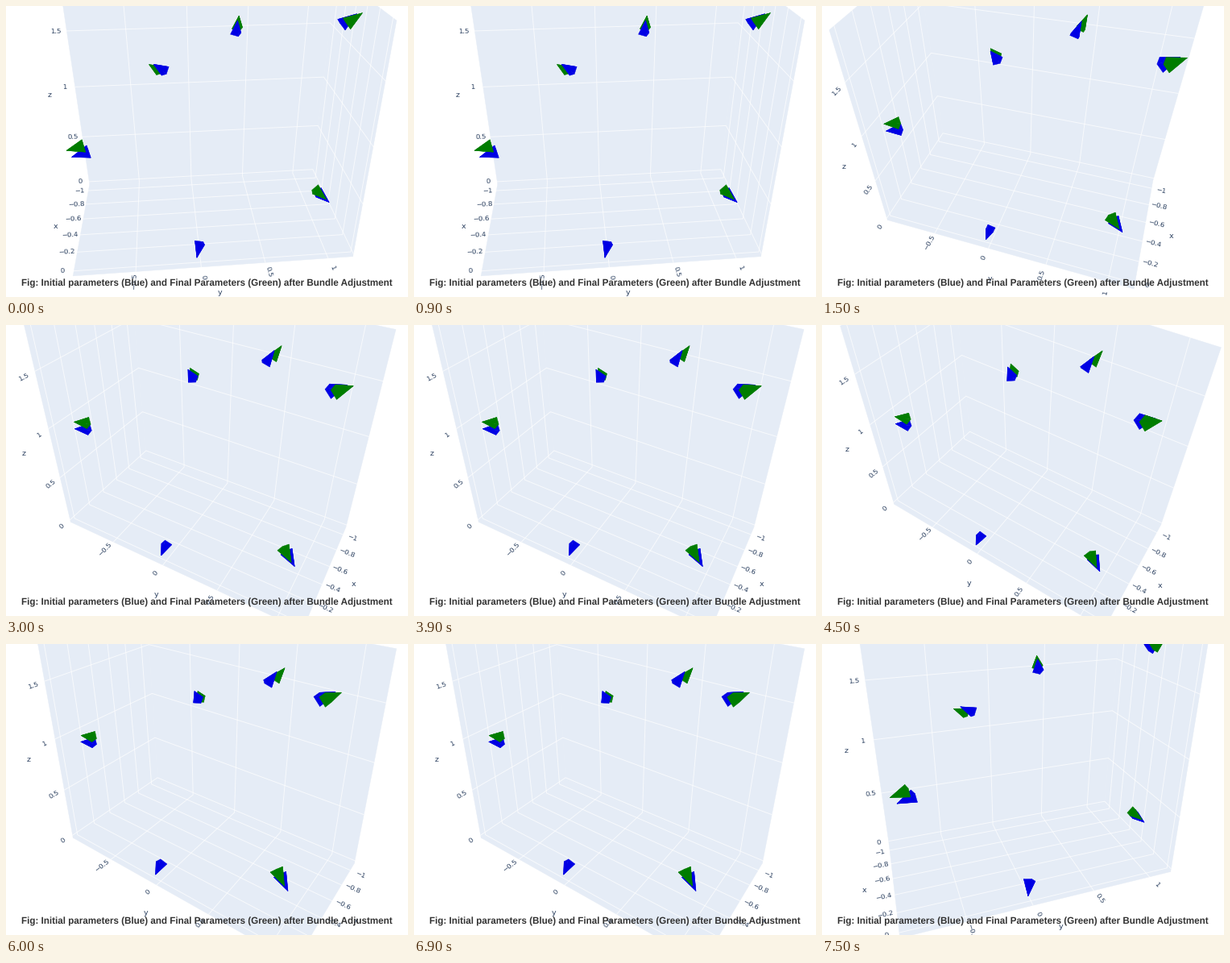
Write a matplotlib script that moves like this. It is 499x361 px and loops after 9000 ms.

```python
import matplotlib.pyplot as plt
import numpy as np
from matplotlib.animation import FuncAnimation
from matplotlib.patches import Polygon

W, H, DPI = 499, 361, 100
HOLD = 1500
PANEL, INK = "#e5ecf6", "#2a3f5f"
GREEN, BLUE = "#007d00", "#0000e4"
CAPTION = ("Fig: Initial parameters (Blue) and Final Parameters (Green) "
           "after Bundle Adjustment")

# Plot box and ticks, in data units.
X0, X1 = -1.1, 0.05
Y0, Y1 = -0.97, 1.2
LO, HI = -0.03, 1.9
X_TICKS = np.linspace(-1, 0, 6)
Y_TICKS = np.linspace(-0.5, 1, 4)
Z_TICKS = np.linspace(0, 1.5, 4)
CORNERS = dict(A=(X0, Y0), B=(X0, Y1), C=(X1, Y1), D=(X1, Y0))

# Each view: the side wall shown, and where heights on the box's vertical
# edges fall on the stage. The camera is solved from these.
VIEWS = [
    (Y1, dict(A={LO: (104, 222), 1: (86, 101), 1.5: (76, 30)},
              B={LO: (382, 206), 1: (394, 89), 1.5: (400, 19)},
              C={LO: (430, 310), HI: (487, 20)}, D={LO: (82, 334)})),
    (Y0, dict(A={LO: (148, 164), 1: (139, 55)},
              B={LO: (411, 215), 1: (441, 109)},
              C={LO: (388, 352)}, D={LO: (82, 263), HI: (7, 32)})),
    (Y0, dict(A={LO: (174, 159), 1: (163, 54)},
              B={LO: (422, 250), 1: (452, 135), HI: (484, 9)},
              C={LO: (366, 380)}, D={LO: (82, 245), 1.5: (36, 55)})),
    (Y0, dict(A={LO: (183, 136), 1: (175, 36)},
              B={LO: (419, 250), 1: (455, 146), HI: (495, 30)},
              C={LO: (351, 377)}, D={LO: (90, 221), HI: (21, 3)})),
    (Y0, dict(A={LO: (188, 169), 1: (180, 62)},
              B={LO: (433, 271), 1: (458, 144), HI: (485, 9)},
              C={LO: (356, 397)}, D={LO: (85, 241), 1.5: (48, 44)})),
    (Y1, dict(A={LO: (83, 249), 1: (65, 118), 1.5: (53, 45)},
              B={LO: (351, 197), 1: (360, 83), 1.5: (366, 19)},
              C={LO: (432, 284), 1: (456, 142)}, D={LO: (97, 364)})),
]

# Frusta in painting order, each sighted in two views to place it in space.
SIGHTED_IN = (0, 3)
FRUSTA = [
    (GREEN, (187, 79), (236, 53)), (BLUE, (193, 79), (233, 58)),
    (GREEN, (289, 23), (340, 39)), (BLUE, (287, 29), (330, 47)),
    (BLUE, (424, 18), (402, 118)), (GREEN, (431, 17), (409, 120)),
    (BLUE, (94, 183), (101, 124)), (GREEN, (88, 176), (100, 115)),
    (BLUE, (392, 235), (340, 297)), (GREEN, (389, 232), (336, 291)),
    (BLUE, (239, 301), (195, 266)),
]
DEPTH, HALF = 0.12, 0.033


def solve_camera(marks):
    """Least-squares 3x4 projection from points on the box's edges."""
    rows, rhs = [], []
    for name, heights in marks.items():
        for z, (u, v) in heights.items():
            p = np.array([*CORNERS[name], z, 1])
            rows.append([*p, 0, 0, 0, 0, *(-u * p[:3])])
            rows.append([0, 0, 0, 0, *p, *(-v * p[:3])])
            rhs += [u, v]
    best = np.linalg.lstsq(np.array(rows), np.array(rhs), rcond=None)[0]
    return np.append(best, 1).reshape(3, 4)


def project(cam, pts):
    pts = np.atleast_2d(pts)
    q = np.column_stack([pts, np.ones(len(pts))]) @ cam.T
    return q[:, :2] / q[:, 2:]


def locate(cams, pixels):
    rows = np.array([px[k] * cam[2] - cam[k]
                     for cam, px in zip(cams, pixels) for k in (0, 1)])
    return np.linalg.lstsq(rows[:, :3], -rows[:, 3], rcond=None)[0]


def unit(v):
    return v / np.linalg.norm(v)


def frustum(pos, middle):
    """Four side faces of a pyramid whose tip points away from the middle."""
    out = unit(pos - middle)
    side = unit(np.cross(out, [1, 0, 0]))
    up = np.cross(side, out)
    tip = pos + out * DEPTH * 0.6
    base = [pos - out * DEPTH * 0.4 + HALF * (a * side + b * up)
            for a, b in ((-1, -1), (1, -1), (1, 1), (-1, 1))]
    return [[tip, base[i], base[i - 1]] for i in range(4)]


def px(size):
    return size * 72 / DPI


plt.rcParams["text.hinting"] = "none"
fig = plt.figure(figsize=((W + 0.01) / DPI, (H + 0.01) / DPI), dpi=DPI,
                 facecolor="white")
ax = fig.add_axes([0, 0, 1, 1])
ax.set_xlim(0, W)
ax.set_ylim(H, 0)
ax.axis("off")


def shape(cam, pts, color, z):
    return ax.add_patch(Polygon(project(cam, pts), closed=True, fc=color,
                                ec=color, lw=0.3, zorder=z))


def label(pos, text, size, angle=0):
    return ax.text(*pos, text, size=px(size), color=INK, rotation=angle,
                   ha="center", va="center", family="DejaVu Sans",
                   zorder=3, clip_on=True)


def axis_labels(cam, title, ticks, point, out):
    """Tick texts beside an edge, turned to run along the outward direction."""
    parts = []
    for t in ticks:
        a, b = project(cam, [point(t), point(t) + out])
        dx, dy = b - a
        angle = (np.degrees(np.arctan2(-dy, dx)) + 90) % 180 - 90
        text = f"{t:.1f}".removesuffix(".0").replace("-", "−")
        parts.append(label(b, "0" if abs(t) < 1e-9 else text, 8.5, angle))
    mid = {"x": X0 + X1, "y": Y0 + Y1, "z": LO + HI}[title] / 2
    spot = project(cam, point(mid) + 2.6 * out)[0]
    return parts + [label(spot, title, 9.5)]


def build(cam, wall, solids):
    open_y = Y0 if wall == Y1 else Y1
    parts = [
        shape(cam, [(X0, Y0, LO), (X0, Y1, LO), (X0, Y1, HI), (X0, Y0, HI)], PANEL, 1),
        shape(cam, [(X0, Y0, LO), (X0, Y1, LO), (X1, Y1, LO), (X1, Y0, LO)], PANEL, 1),
        shape(cam, [(X0, wall, LO), (X1, wall, LO), (X1, wall, HI), (X0, wall, HI)], PANEL, 1),
    ]

    bends = [[(X0, open_y, z), (X0, wall, z), (X1, wall, z)] for z in Z_TICKS]
    bends += [[(X0, y, HI), (X0, y, LO), (X1, y, LO)] for y in Y_TICKS]
    bends += [[(x, wall, HI), (x, wall, LO), (x, open_y, LO)] for x in X_TICKS]
    for bend in bends:
        parts += ax.plot(*project(cam, bend).T, color="white", lw=px(1),
                         alpha=0.7, zorder=2)

    toward_x = np.array([0.1, 0, 0])
    toward_y = np.array([0, 0.085 * np.sign(open_y), 0])
    edge_x, z_out = (X0, toward_y) if wall == Y1 else (X1, toward_x)
    parts += axis_labels(cam, "x", X_TICKS,
                         lambda t: np.array([t, open_y, LO]), toward_y)
    parts += axis_labels(cam, "y", Y_TICKS,
                         lambda t: np.array([X1, t, LO]), toward_x)
    parts += axis_labels(cam, "z", Z_TICKS,
                         lambda t: np.array([edge_x, Y0, t]), z_out)

    for order, (color, faces) in enumerate(solids):
        parts += [shape(cam, face, color, 4 + order / 100) for face in faces]
    return parts


cams = [solve_camera(marks) for _, marks in VIEWS]
pair = [cams[i] for i in SIGHTED_IN]
places = [locate(pair, seen) for _, *seen in FRUSTA]
middle = np.mean(places, axis=0)
solids = [(f[0], frustum(p, middle)) for f, p in zip(FRUSTA, places)]
groups = [build(cam, wall, solids) for cam, (wall, _) in zip(cams, VIEWS)]

ax.text(18.5, 347, CAPTION, size=px(11.62), color="#333333", weight="bold",
        family="Liberation Sans", ha="left", va="baseline", zorder=6)


def show(i):
    for k, group in enumerate(groups):
        for part in group:
            part.set_visible(k == i)
    return []


def start():
    return show(0)


anim = FuncAnimation(fig, show, frames=len(VIEWS), init_func=start,
                     interval=HOLD, repeat=True, repeat_delay=0, blit=False)
plt.show()
```
